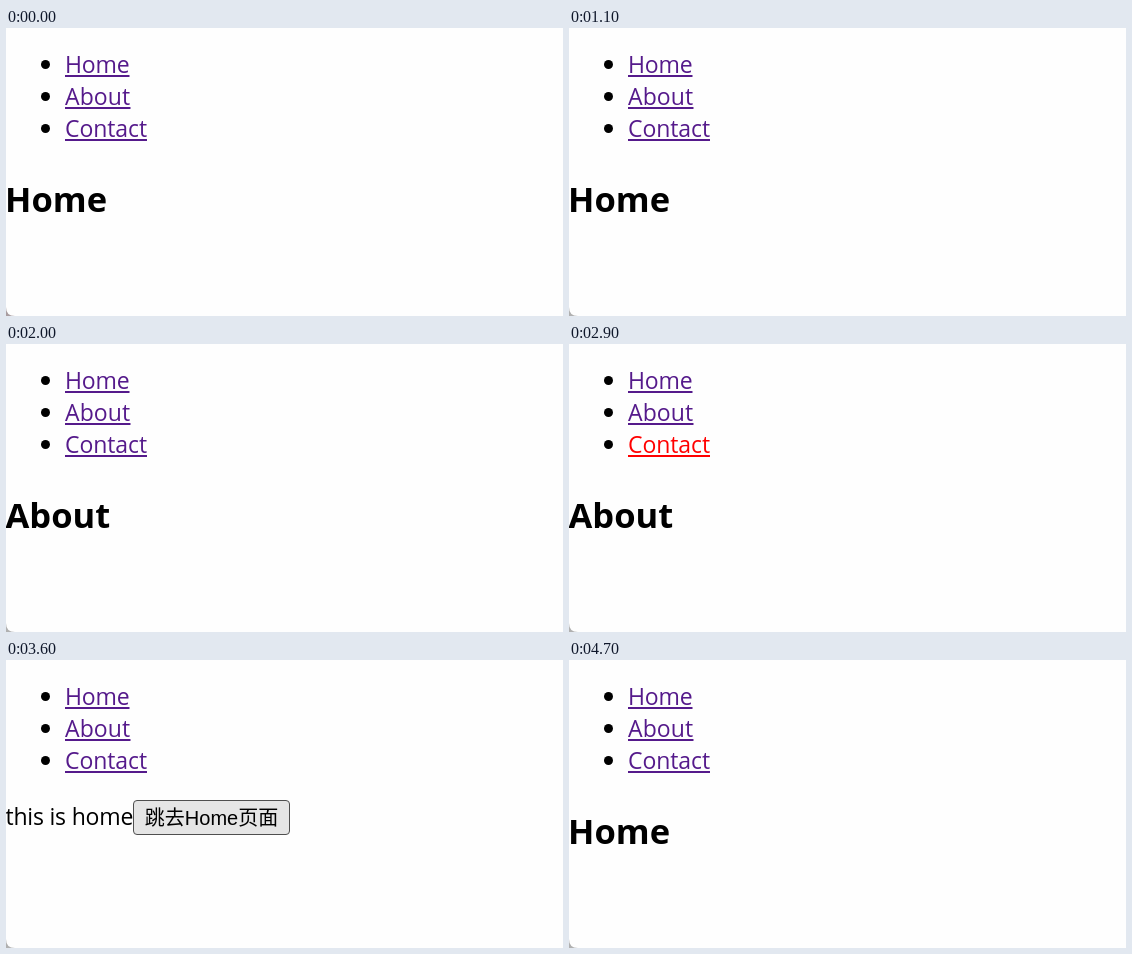
An HTML page for the animation above (6200 ms loop, 557 by 288 pixels).

```html
<!DOCTYPE html>
<html lang="en">
<head>
<meta charset="utf-8">
<title>Navigation demo</title>
<style>
html, body { margin: 0; width: 100%; height: 100%; overflow: hidden; background: #fefefe; }
svg { display: block; width: 557px; height: 288px; }
text { font: 23px "Open Sans", "Noto Sans", sans-serif; white-space: pre; }
svg * { animation: 6200ms step-end infinite; }

.link { fill: #551a8b; }
.home { letter-spacing: -.2px; animation-name: press-home; }
.about { letter-spacing: .1px; animation-name: press-about; }
.contact { letter-spacing: -.07px; animation-name: press-contact; }
.title { font-size: 34.5px; font-weight: 700; }
.home-title { animation-name: home-page; }
.about-title { visibility: hidden; animation-name: about-page; }
.contact-page { visibility: hidden; animation-name: contact-page; }
.note { letter-spacing: -.2px; }
.button { fill: #efefef; stroke: #767676; animation-name: button; }
.label { font: 20px "Liberation Sans", "Noto Sans CJK SC", "Noto Sans CJK", sans-serif; text-anchor: middle; }
.corner { fill: #b0b0b0; animation-name: corner; }

@keyframes press-home {
  16.129% { fill: #f00; }
  17.742% { fill: #551a8b; }
}
@keyframes press-about {
  30.645% { fill: #f00; }
  32.258% { fill: #551a8b; }
}
@keyframes press-contact {
  46.774% { fill: #f00; }
  50% { fill: #551a8b; }
}
@keyframes home-page {
  0%, 75.806% { visibility: visible; }
  32.258% { visibility: hidden; }
}
@keyframes about-page {
  32.258% { visibility: visible; }
  50% { visibility: hidden; }
}
@keyframes contact-page {
  50% { visibility: visible; }
  75.806% { visibility: hidden; }
}
@keyframes button {
  58.065% { fill: #e5e5e5; stroke: #4f4f4f; }
  72.581% { fill: #f5f5f5; stroke: #8d8d8d; }
}
@keyframes corner {
  0% { fill: #a99da0; }
  16.129% { fill: #b0b0b0; }
}
</style>
</head>
<body>
<svg viewBox="0 0 557 288">
  <g>
    <circle cx="39.5" cy="36.5" r="4.5"/>
    <circle cx="39.5" cy="68.5" r="4.5"/>
    <circle cx="39.5" cy="100.5" r="4.5"/>
  </g>
  <g class="link home">
    <text x="59" y="45">Home</text>
    <rect x="59" y="47" width="64.5" height="2"/>
  </g>
  <g class="link about">
    <text x="59" y="77">About</text>
    <rect x="59" y="79" width="65.5" height="2"/>
  </g>
  <g class="link contact">
    <text x="59" y="109">Contact</text>
    <rect x="59" y="111" width="82" height="2"/>
  </g>

  <text class="title home-title" x="-1" y="184">Home</text>
  <text class="title about-title" x="-.5" y="184">About</text>
  <g class="contact-page">
    <text class="note" x="-.5" y="165">this is home</text>
    <rect class="button" x="127.5" y="140.5" width="156" height="34" rx="3.5"/>
    <text class="label" x="205.5" y="165">跳去Home页面</text>
  </g>

  <path class="corner" d="M0 279Q0 288 9 288H0Z"/>
</svg>
</body>
</html>
```
